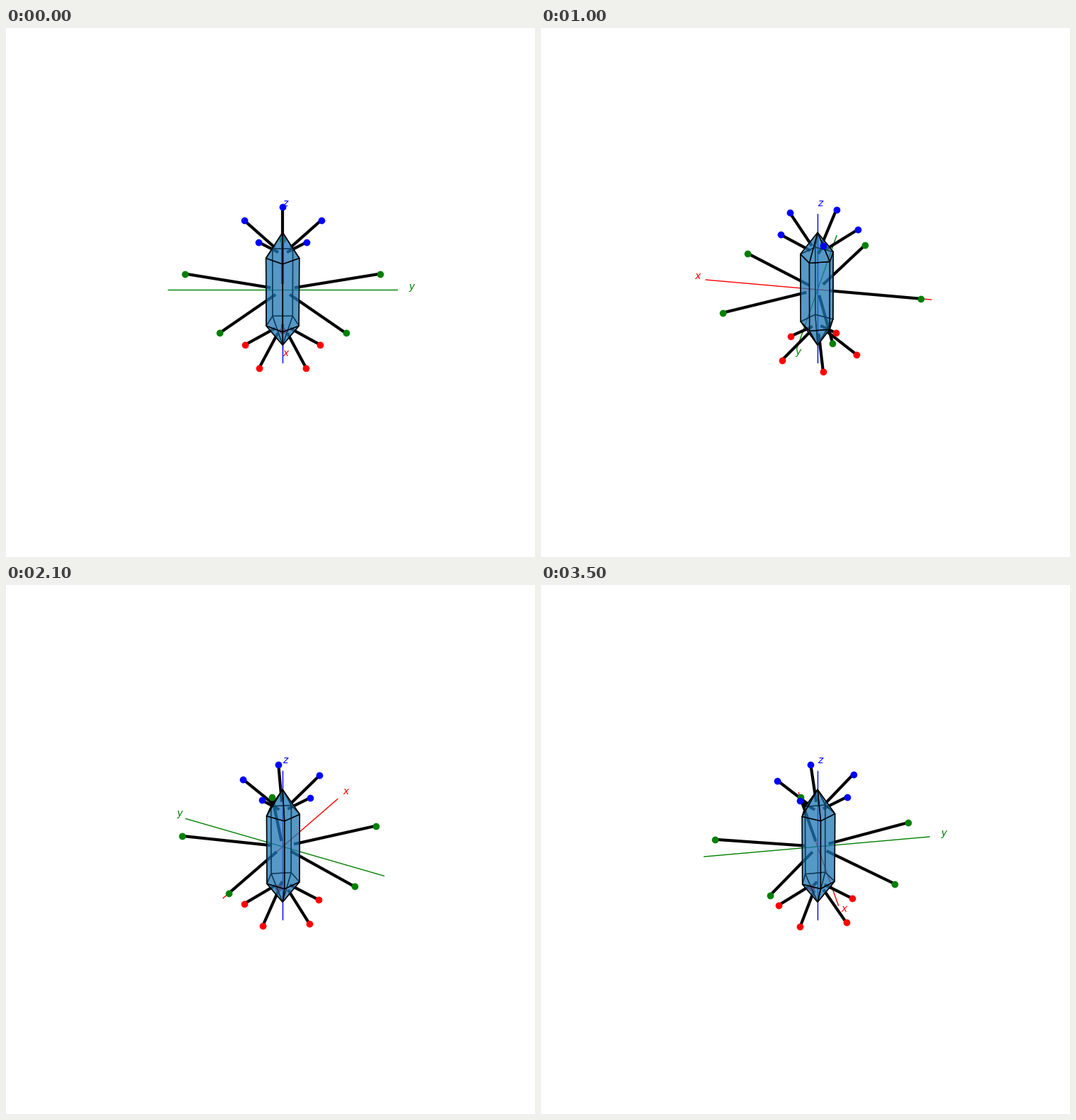
Write a matplotlib script that moves like this. It is 748 px wide and 748 px high and loops after 3.6 s.

```python
import numpy as np
import matplotlib.pyplot as plt
from matplotlib.animation import FuncAnimation
from mpl_toolkits.mplot3d.art3d import Poly3DCollection

FRAMES = 36
SIDES = 5
RADIUS, SHOULDER, APEX = 1.0, 3.0, 5.0
REACH = 6.0                      # distance of the dots from the centre
TILT = np.arctan2(5, 12)         # lean of the end spikes from the z axis
AXIS = 1.1 * REACH
LIMIT = 1.1 * AXIS * 25 / 24
BODY = (0x1f / 255, 0x77 / 255, 0xb4 / 255, 0.5)


def ring(radius, z, offset=0.0):
    a = 2 * np.pi * (np.arange(SIDES) + offset) / SIDES
    return np.column_stack([radius * np.cos(a), radius * np.sin(a),
                            np.full(SIDES, z)])


def crystal_faces():
    top, low = ring(RADIUS, SHOULDER), ring(RADIUS, -SHOULDER)
    tip = np.array([0, 0, APEX])
    caps, walls, bases = [], [], []
    for i in range(SIDES):
        j = (i + 1) % SIDES
        caps.append(np.array([top[i], top[j], tip]))
        walls.append(np.array([low[i], low[j], top[j], top[i]]))
        bases.append(np.array([low[i], low[j], -tip]))
    return caps, walls, bases


def draw_axes(ax):
    for name, color, unit in zip("xyz", "rgb", np.eye(3)):
        ends = np.outer([-AXIS, AXIS], unit)
        ax.plot(*ends.T, color=color, lw=1)
        ax.text(*(1.1 * AXIS * unit), f"${name}$", color=color, fontsize=10)


def draw_spikes(ax, faces, dots, color):
    for face, dot in zip(faces, dots):
        ax.plot(*np.array([face.mean(axis=0), dot]).T, color="k", lw=3)
        ax.scatter(*dot, color=color, s=36, depthshade=False)


fig = plt.figure(figsize=(7.48, 7.48), dpi=100, facecolor="white")
ax = fig.add_subplot(projection="3d")
ax.set_axis_off()

caps, walls, bases = crystal_faces()
draw_axes(ax)
side, height = REACH * np.sin(TILT), REACH * np.cos(TILT)
draw_spikes(ax, caps, ring(side, height, 0.5), "b")
draw_spikes(ax, walls, ring(REACH, 0, 0.5), "g")
draw_spikes(ax, bases, ring(side, -height, 0.5), "r")
ax.add_collection3d(Poly3DCollection(caps + walls + bases, facecolors=[BODY],
                                     edgecolors="k", linewidths=1))
ax.set(xlim=(-LIMIT, LIMIT), ylim=(-LIMIT, LIMIT), zlim=(-LIMIT, LIMIT))


def update(i):
    ax.view_init(elev=30, azim=360 * i / FRAMES)
    return []


anim = FuncAnimation(fig, update, frames=FRAMES, interval=100, repeat=True)
plt.show()
```
